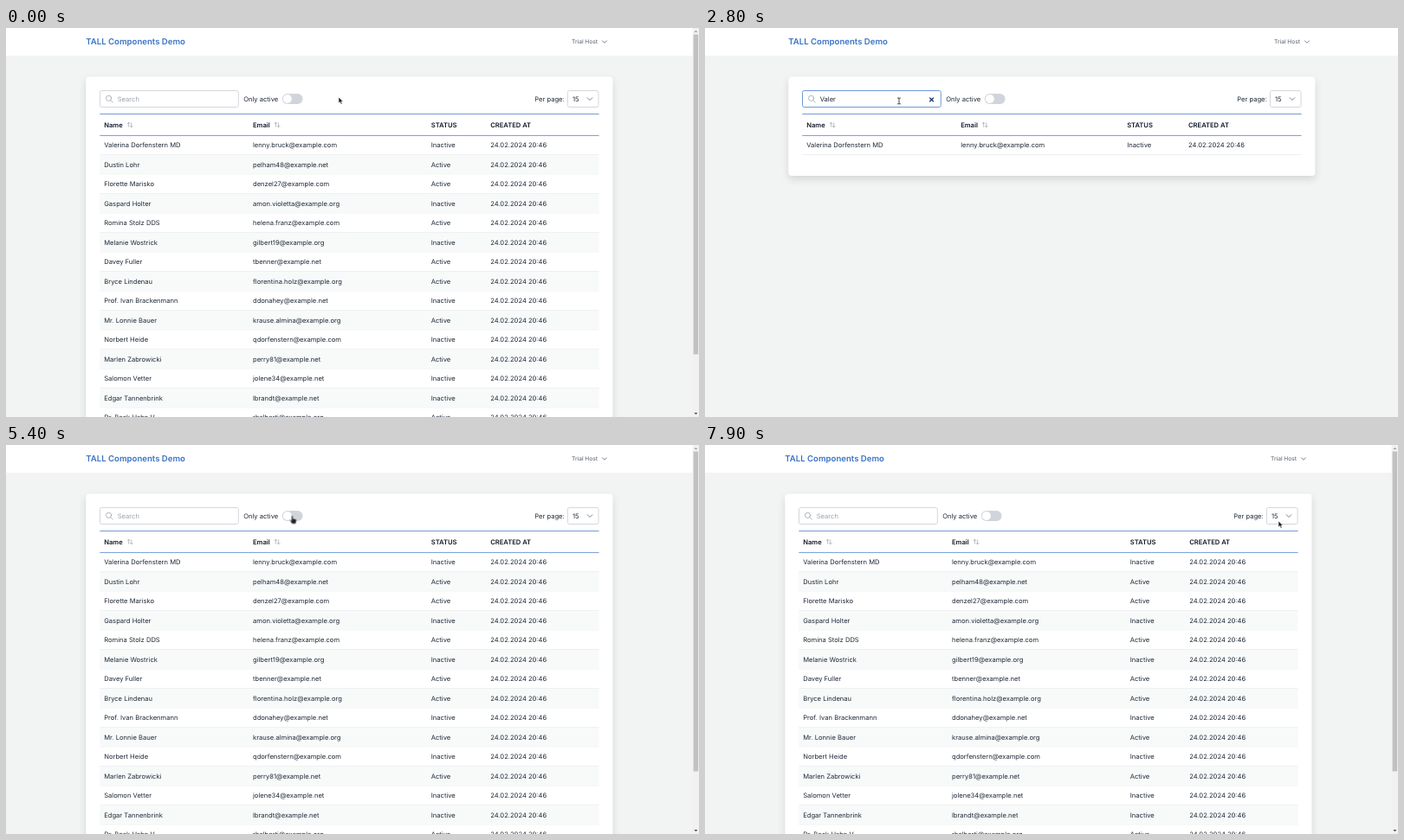
These frames come from a looping animation (800 px wide and 450 px high, 8 s). An HTML page:

```html
<!DOCTYPE html>
<html lang="en">
<head>
<meta charset="utf-8">
<title>Table demo</title>
<style>
html, body { margin: 0; width: 100%; height: 100%; overflow: hidden; background: #f2f4f4; }
svg { display: block; width: 800px; height: 450px; }
text { font: 7.6px Inter, "Open Sans", sans-serif; fill: #1f2937; text-rendering: geometricPrecision; white-space: pre; }
.logo { font-size: 9.6px; font-weight: 600; fill: #3a72c6; }
.user { font-size: 6.6px; font-weight: 500; fill: #6b7280; }
.head { font-weight: 600; fill: #111827; }
.hint { fill: #9ca3af; }
.line { fill: none; stroke-linecap: round; stroke-linejoin: round; }
.card { fill: #fff; filter: drop-shadow(0 4px 4px rgb(0 0 0 / .12)); }
.bar { fill: #fff; filter: drop-shadow(0 .5px .5px rgb(0 0 0 / .08)); }
.rule { stroke: #729bd7; stroke-width: 1; }

/* one loop is 8 s, so 1.25% is one 100 ms tick */
.anim { animation: 8s step-end -10ms infinite; }
#page { animation-name: shift; }
#all { animation-name: all; }
#one { animation-name: one; }
#act { animation-name: act; }
#scroll { animation-name: scroll; }
#box { animation-name: focus; }
#hint { animation-name: hint; }
#clear { animation-name: clear; }
#caret { animation-name: blink, caret; }
.k1 { animation-name: key1; }
.k2 { animation-name: key2; }
.k3 { animation-name: key3; }
.k4 { animation-name: key4; }
#track { animation-name: track; }
#knob { animation-name: knob; }
#cursor { animation-name: move; }
#arrow { animation-name: arrow; }
#beam { animation-name: beam; }
#hand { animation-name: hand; }

@keyframes shift { 0%, 50%, 100% { transform: none; } 35% { transform: translateX(4px); } }
@keyframes scroll { 0%, 50%, 100% { visibility: visible; } 35% { visibility: hidden; } }
@keyframes all { 0%, 50%, 83.75%, 100% { visibility: visible; } 35%, 68.75% { visibility: hidden; } }
@keyframes one { 0%, 50%, 100% { visibility: hidden; } 35% { visibility: visible; } }
@keyframes act { 0%, 83.75%, 100% { visibility: hidden; } 68.75% { visibility: visible; } }
@keyframes focus { 0%, 66.25%, 100% { stroke: #d1d5db; } 8.75% { stroke: #6893d5; } }
@keyframes hint { 0%, 47.5%, 100% { visibility: visible; } 21.25% { visibility: hidden; } }
@keyframes clear { 0%, 47.5%, 100% { visibility: hidden; } 21.25% { visibility: visible; } }
@keyframes key1 { 0%, 47.5%, 100% { fill-opacity: 0; } 21.25% { fill-opacity: 1; } }
@keyframes key2 { 0%, 47.5%, 100% { fill-opacity: 0; } 23.75% { fill-opacity: 1; } }
@keyframes key3 { 0%, 47.5%, 100% { fill-opacity: 0; } 26.25% { fill-opacity: 1; } }
@keyframes key4 { 0%, 47.5%, 100% { fill-opacity: 0; } 27.5% { fill-opacity: 1; } }
@keyframes blink {
  0%, 16.25%, 35%, 55%, 66.25%, 100% { opacity: 0; }
  8.75%, 21.25%, 41.25%, 61.25% { opacity: 1; }
}
@keyframes caret {
  0%, 47.5%, 100% { transform: none; }
  21.25% { transform: translateX(5.7px); }
  23.75% { transform: translateX(9.9px); }
  26.25% { transform: translateX(16.2px); }
  27.5% { transform: translateX(19.2px); }
}
@keyframes track { 0%, 82.5%, 100% { fill: #d1d5db; } 68.75% { fill: #3a72c6; } }
@keyframes knob {
  0%, 83.75%, 100% { transform: none; }
  68.75%, 82.5% { transform: translateX(7px); }
  70% { transform: translateX(11.4px); }
}
@keyframes move {
  0% { transform: translate(384px, 80px); }
  1.25% { transform: translate(470px, 98px); }
  2.5% { transform: translate(556px, 122px); }
  3.75% { transform: translate(470px, 104px); }
  5% { transform: translate(320px, 78px); }
  6.25% { transform: translate(224px, 84px); }
  38.75% { transform: translate(224px, 84px); animation-timing-function: steps(5); }
  45% { transform: translate(260px, 83px); }
  47.5% { transform: translate(261px, 83px); }
  48.75% { transform: translate(261px, 83px); animation-timing-function: steps(6); }
  56.25% { transform: translate(290.5px, 86px); }
  57.5% { transform: translate(290.5px, 86px); animation-timing-function: steps(8); }
  67.5% { transform: translate(330.5px, 81.5px); }
  68.75% { transform: translate(331.4px, 82px); }
  83.75% { transform: translate(331.4px, 82px); animation-timing-function: steps(3); }
  87.5% { transform: translate(450px, 48px); animation-timing-function: steps(3); }
  91.25% { transform: translate(738px, 8px); }
  92.5% { transform: translate(755px, 57px); animation-timing-function: steps(5); }
  98.75%, 100% { transform: translate(662px, 88px); }
}
@keyframes arrow { 0%, 85%, 100% { visibility: visible; } 6.25% { visibility: hidden; } }
@keyframes beam { 0%, 43.75%, 52.5%, 100% { visibility: hidden; } 6.25%, 47.5% { visibility: visible; } }
@keyframes hand { 0%, 47.5%, 85%, 100% { visibility: hidden; } 43.75%, 52.5% { visibility: visible; } }
</style>
</head>
<body>
<svg viewBox="0 0 800 450" xmlns="http://www.w3.org/2000/svg">
  <rect width="800" height="450" fill="#f2f4f4"/>
  <rect class="bar" width="800" height="32"/>

  <g id="page" class="anim">
    <text class="logo" x="92.3" y="19.3">TALL Components Demo</text>
    <text class="user" x="653" y="18">Trial Host</text>
    <path class="line" d="M688.4 14.8l2.5 2.5 2.5-2.5" stroke="#6b7280" stroke-width=".9"/>

    <g id="all" class="anim"></g>
    <g id="one" class="anim"></g>
    <g id="act" class="anim"></g>

    <rect id="box" class="anim" x="108.5" y="72.5" width="159.8" height="19" rx="2" fill="#fff" stroke-width=".95"/>
    <g class="line" stroke="#9ca3af" stroke-width=".8">
      <circle cx="118.6" cy="81.3" r="3.1"/><path d="M121 83.7l2.5 2.5"/>
    </g>
    <text id="hint" class="hint anim" x="128.7" y="84.6">Search</text>
    <text x="128.7" y="84.6"><tspan class="anim k1">V</tspan><tspan class="anim k2">a</tspan><tspan class="anim k3">le</tspan><tspan class="anim k4">r</tspan></text>
    <rect id="caret" class="anim" x="128.6" y="77.6" width=".8" height="9" fill="#111827"/>
    <path id="clear" class="line anim" d="M255.7 81l3.8 3.8m0-3.8l-3.8 3.8" stroke="#1e3f7a" stroke-width="1.4"/>

    <text x="274.2" y="84.6">Only active</text>
    <rect id="track" class="anim" x="318.8" y="76" width="23.8" height="12" rx="6"/>
    <circle id="knob" class="anim" cx="324.9" cy="82" r="5" fill="#fff"/>

    <text x="610.2" y="84.6">Per page:</text>
    <rect x="648.4" y="72.5" width="35.6" height="19" rx="2" fill="#fff" stroke="#d1d5db" stroke-width=".95"/>
    <text x="654" y="84.6">15</text>
    <path class="line" d="M671.2 80.7l2.8 2.8 2.8-2.8" stroke="#6b7280" stroke-width=".9"/>
  </g>

  <g id="scroll" class="anim">
    <rect x="792.6" width="7.4" height="450" fill="#f1f1f1"/>
    <rect x="793.6" y="7.5" width="5.5" height="370" fill="#c1c1c1"/>
    <path d="M794.4 5l2-2.3 2 2.3z" fill="#a3a3a3"/>
    <path d="M794.4 445l2 2.3 2-2.3z" fill="#505050"/>
  </g>

  <g id="cursor" class="anim">
    <path id="arrow" class="anim" d="M0 0v7l1.6-1.5 1.2 2.7 1.3-.6-1.2-2.6h2.2z" fill="#222" stroke="#fff" stroke-width=".5"/>
    <path id="beam" class="line anim" d="M-1.6-3h1.2l.4.4.4-.4h1.2M0-2.6v6M-1.6 3.8h1.2l.4-.4.4.4h1.2" stroke="#222" stroke-width=".8"/>
    <path id="hand" class="anim" d="M-.9.6Q0-.7.9.6V3.6l3 .6q1.1.3 1 1.5l-.5 2.2-.6 1.9H-.2L-2.6 6.3q-.4-1.3.7-1l1 .8z" fill="#222" stroke="#fff" stroke-width=".5"/>
  </g>
</svg>
<script>
// name, mailbox, top-level domain, active
const people = [
  ["Valerina Dorfenstern MD", "lenny.bruck", "com", 0],
  ["Dustin Lohr", "pelham48", "net", 1],
  ["Florette Marisko", "denzel27", "com", 1],
  ["Gaspard Holter", "amon.violetta", "org", 0],
  ["Romina Stolz DDS", "helena.franz", "com", 1],
  ["Melanie Wostrick", "gilbert19", "org", 0],
  ["Davey Fuller", "tbenner", "net", 1],
  ["Bryce Lindenau", "florentina.holz", "org", 1],
  ["Prof. Ivan Brackenmann", "ddonahey", "net", 0],
  ["Mr. Lonnie Bauer", "krause.almina", "org", 1],
  ["Norbert Heide", "qdorfenstern", "com", 0],
  ["Marlen Zabrowicki", "perry81", "net", 1],
  ["Salomon Vetter", "jolene34", "net", 0],
  ["Edgar Tannenbrink", "lbrandt", "net", 0],
  ["Dr. Beck Hahn V", "rhalberti", "org", 1],
  ["Clarity Bender DVM", "mollie.ruhn", "com", 1],
  ["Cord Sandler", "bartz.lindell", "net", 1],
  ["Leopold Niver", "nathan.fairley", "org", 1],
  ["Tobiel Krohn", "dietzel.marietta", "org", 1],
  ["Ina Donnally", "hugo.herbach", "net", 1],
  ["Philina Dietzel", "zhollern", "net", 1],
  ["Prof. Kurt Adamsson MD", "rosenhagen.mikel", "com", 1]
];
const top0 = 124.4, rowH = 22.5;

const text = (x, y, s, cls = "") => `<text x="${x}" y="${y}" class="${cls}">${s}</text>`;
const rule = y => `<path class="rule" d="M108.3 ${y}h576.3"/>`;
const sortIcon = x => `<g class="line" stroke="#9ca3af" stroke-width=".7" transform="translate(${x} 112)">
  <path d="M-1.6 2.2v-5m-1.5 1.5l1.5-1.5 1.5 1.5M1.6-2.2v5m-1.5-1.5l1.5 1.5 1.5-1.5"/></g>`;

function row([name, box, tld, active], i, [mail, status, date]) {
  const y = top0 + i * rowH, base = y + 13.6;
  return `<rect x="108.3" y="${y}" width="576.3" height="${rowH}" fill="${i % 2 ? "#f8fafa" : "#fff"}"/>
    <rect x="108.3" y="${y + rowH - .5}" width="576.3" height=".6" fill="#dfe3e6"/>` +
    text(113.2, base, name) + text(mail, base, `${box}@example.${tld}`) +
    text(status, base, active ? "Active" : "Inactive") + text(date, base, "24.02.2024 20:46");
}

function view(id, list, cols, height) {
  const [mail, status, date] = cols;
  document.getElementById(id).innerHTML =
    `<rect class="card" x="92.4" y="56.6" width="608" height="${height}" rx="3.8"/>` +
    list.map((p, i) => row(p, i, cols)).join("") + rule(99.5) + rule(124.4) +
    text(113.2, 114.7, "Name", "head") + sortIcon(143.2) +
    text(mail, 114.7, "Email", "head") + sortIcon(mail + 28) +
    text(status, 114.7, "STATUS", "head") + text(date, 114.7, "CREATED AT", "head");
}

view("all", people.slice(0, 15), [285, 490.8, 559.2], 440);
view("one", people.slice(0, 1), [291.2, 483.2, 554], 114.4);
view("act", people.filter(p => p[3]), [278.8, 493.8, 561.2], 440);
</script>
</body>
</html>
```
